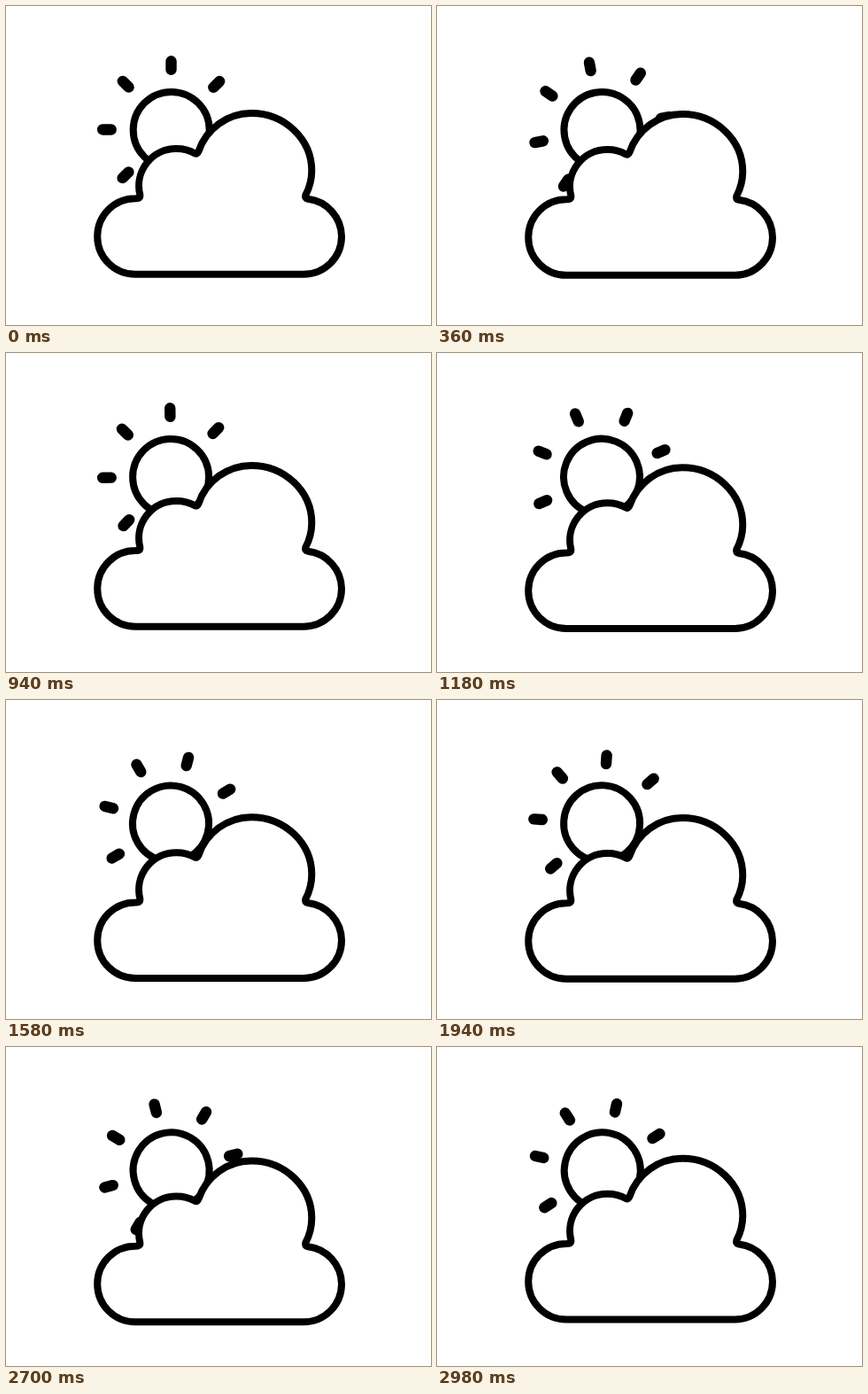
These frames come from a looping animation (480 px wide and 360 px high, 3 s). An HTML page:

```html
<!DOCTYPE html>
<html lang="en">
<head>
<meta charset="utf-8">
<title>Partly cloudy</title>
<style>
  html, body { margin: 0; width: 100%; height: 100%; overflow: hidden; background: #fff; }
  svg { display: block; width: 100vw; height: 100vh; }
  .line { fill: #fff; stroke: #000; stroke-width: 8; stroke-linejoin: round; }
  .ray { stroke: #000; stroke-width: 12.4; stroke-linecap: round; }
</style>
</head>
<body>
<svg viewBox="0 0 480 360">
  <g id="sun">
    <circle class="line" cx="0.3" cy="0.3" r="43"/>
  </g>
  <path id="cloud" class="line" d="
    M146 302.8
    A42.8 42.8 0 0 1 146 217.2
    L149 217 Q152 216.5 151.3 213
    A42 42 0 0 1 192 161
    A42 42 0 0 1 213.5 166.4
    Q216 167.5 217.5 164
    A63 63 0 0 1 277 121
    A68.3 65 0 0 1 345.3 186
    A60 60 0 0 1 338.3 213.5
    Q337.5 217 341 217.8
    A43 43 0 0 1 379 260
    A42.8 42.8 0 0 1 336.2 302.8
    Z"/>
</svg>
<script>
  const LOOP = 3000;   // the loop restarts before a full turn is done
  const TURN = 3800;   // one sun rotation and one cloud bob
  const DROP = 12;
  const sun = document.getElementById('sun');
  const cloud = document.getElementById('cloud');

  for (let i = 0; i < 8; i++) {
    const ray = document.createElementNS(sun.namespaceURI, 'line');
    ray.setAttribute('class', 'ray');
    ray.setAttribute('y1', -77.3);
    ray.setAttribute('y2', -67.7);
    ray.setAttribute('transform', `rotate(${i * 45})`);
    sun.append(ray);
  }

  const start = performance.now();

  function draw(now) {
    const turn = (Math.max(0, now - start) % LOOP) / TURN;
    const y = DROP * (1 - Math.cos(turn * 2 * Math.PI)) / 2;
    sun.setAttribute('transform', `translate(186.4 139.6) rotate(${turn * 360})`);
    cloud.setAttribute('transform', `translate(0 ${y})`);
    requestAnimationFrame(draw);
  }
  draw(start);
</script>
</body>
</html>
```
